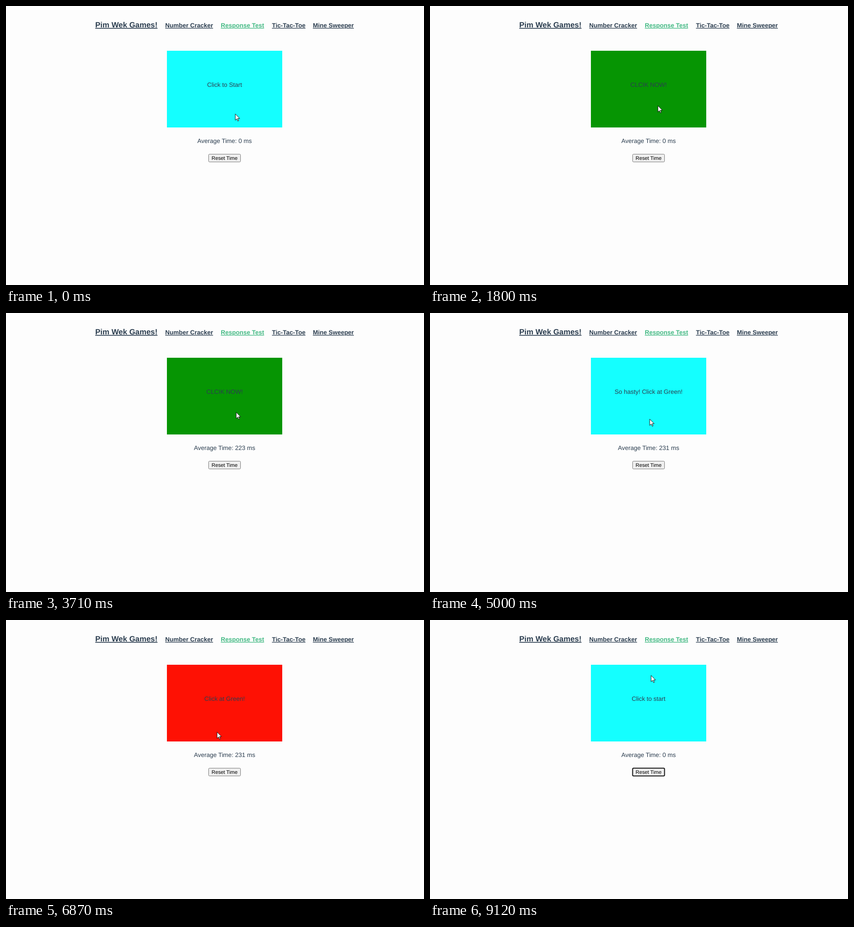
These frames come from a looping animation (917x611 px, 9180 ms). An HTML page:

```html
<!DOCTYPE html>
<html lang="en">
<head>
<meta charset="utf-8">
<title>Response Test</title>
<style>
  html, body { margin: 0; width: 100%; height: 100%; overflow: hidden; background: #fdfdfd; }
  svg { display: block; width: 917px; height: 611px; }
  text { font: 13.49px "Liberation Sans", Arial, sans-serif; fill: #2c3e50; text-rendering: geometricPrecision; }
  .nav text { font-weight: bold; text-decoration: underline; }
  .nav .title { font-size: 16.87px; }
  .nav .active { fill: #42b983; }
  .mid { text-anchor: middle; }
  .button text { font-size: 11.24px; fill: #000; }
  .button rect { fill: #efefef; stroke: #767676; }
  .button.focus rect { stroke: #101010; stroke-width: 2; }
</style>
</head>
<body>
<svg viewBox="0 0 917 611">
  <g class="nav">
    <text class="title" x="195.8" y="47">Pim Wek Games!</text>
    <text x="349.3" y="47">Number Cracker</text>
    <text class="active" x="471.3" y="47">Response Test</text>
    <text x="583.5" y="47">Tic-Tac-Toe</text>
    <text x="673.2" y="47">Mine Sweeper</text>
  </g>
  <rect id="panel" x="353" y="98" width="253" height="168"/>
  <text id="message" class="mid" x="479.5" y="177"></text>
  <text id="average" class="mid" x="479.5" y="300"></text>
  <g id="button" class="button">
    <rect x="444.5" y="324.5" width="70" height="17" rx="2"/>
    <text class="mid" x="479.5" y="337">Reset Time</text>
  </g>
  <path id="cursor" d="M.5 .5V16.8L4.3 13.2L7 19L9.3 18L6.7 12.3H12Z"
        fill="#fff" stroke="#000" stroke-width="1.1"/>
</svg>
<script>
  const LOOP = 9180, FOCUS_AT = 9030;
  const AQUA = '#14ffff', RED = '#fe1104', GREEN = '#069503';
  const WAIT = 'Click at Green!', NOW = 'CLCIK NOW!';
  const START = 'Click to start', HASTY = 'So hasty! Click at Green!';

  // start time, panel colour, message, average
  const states = [
    [0, AQUA, 'Click to Start', '0'],
    [400, RED, WAIT, '0'],
    [1800, GREEN, NOW, '0'],
    [1930, AQUA, START, '223'],
    [2350, RED, WAIT, '223'],
    [3710, GREEN, NOW, '223'],
    [3840, AQUA, START, '231'],
    [4650, RED, WAIT, '231'],
    [5000, AQUA, HASTY, '231'],
    [6510, RED, WAIT, '231'],
    [7590, GREEN, NOW, '231'],
    [7710, AQUA, START, '248.66666666666666'],
    [8300, AQUA, START, '0']
  ];

  // time, x, y of the pointer tip
  const path = [
    [0, 503, 236], [30, 503, 236], [730, 500, 218], [2260, 500, 218],
    [2570, 505, 217], [3840, 505, 217], [4330, 482, 232], [5610, 482, 232],
    [6150, 545, 278], [6240, 545, 278], [6500, 478, 241], [6870, 463, 245],
    [8000, 463, 245], [8240, 478, 336], [8560, 478, 336],
    [8690, 526, 222], [8800, 485, 121], [LOOP, 485, 121]
  ];

  const [panel, message, average, button, cursor] =
    ['panel', 'message', 'average', 'button', 'cursor'].map(id => document.getElementById(id));
  let shown;

  function show(state) {
    if (state === shown) return;
    shown = state;
    panel.setAttribute('fill', state[1]);
    message.textContent = state[2];
    average.textContent = `Average Time: ${state[3]} ms`;
  }

  function pointerAt(t) {
    const i = path.findIndex(p => p[0] > t);
    const [t0, x0, y0] = path[i - 1], [t1, x1, y1] = path[i];
    const u = (t - t0) / (t1 - t0), k = u * u * (3 - 2 * u);
    return [x0 + (x1 - x0) * k, y0 + (y1 - y0) * k].map(Math.round);
  }

  function draw() {
    const t = performance.now() % LOOP;
    show(states.findLast(s => s[0] <= t));
    button.classList.toggle('focus', t >= FOCUS_AT);
    const [x, y] = pointerAt(t);
    cursor.setAttribute('transform', `translate(${x - 0.4} ${y}) scale(.843)`);
    requestAnimationFrame(draw);
  }
  draw();
</script>
</body>
</html>
```
